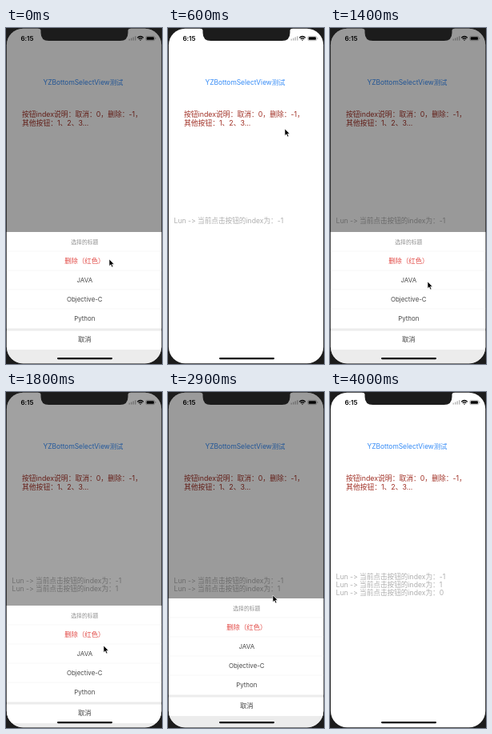
Write an HTML page that moves like this. It is 195 by 420 pixels and loops after 4.1 s.

```html
<!DOCTYPE html>
<html lang="zh-CN">
<head>
<meta charset="utf-8">
<title>YZBottomSelectView</title>
<style>
  html, body { margin: 0; width: 100%; height: 100%; overflow: hidden; background: #1c1c1c; }
  svg { display: block; width: 100%; height: 100%; }
  text {
    font-family: Inter, "Noto Sans CJK SC", "Noto Sans CJK", sans-serif;
    font-feature-settings: "calt" 0, "liga" 0;
    white-space: pre;
  }
  .note { font-size: 8.8px; fill: #a02f24; }
  .log { font-size: 8.65px; fill: #aeaeae; }
  .option { font-size: 7.9px; fill: #484848; text-anchor: middle; }
  .heading { font-size: 6.8px; fill: #909090; }
  .danger { font-size: 8.4px; fill: #e24c48; }
  .cancel { font-size: 8.4px; }
</style>
</head>
<body>
<svg viewBox="0 0 195 420" preserveAspectRatio="none">
  <defs>
    <clipPath id="screen"><rect x=".9" y=".7" width="193.3" height="418.6" rx="20.5"/></clipPath>
  </defs>
  <g clip-path="url(#screen)">
    <rect width="195" height="420" fill="#fff"/>

    <!-- status bar -->
    <text x="18.4" y="16.2" font-size="8" font-weight="600">6:15</text>
    <g fill="#bbb">
      <rect x="153.5" y="13.6" width="1.5" height="2"/>
      <rect x="156" y="12.6" width="1.5" height="3"/>
      <rect x="158.5" y="11.4" width="1.5" height="4.2"/>
      <rect x="161" y="10.2" width="1.5" height="5.4"/>
    </g>
    <g fill="none" stroke="#000" stroke-width="1.2">
      <path d="M164.2 12.2Q168 8.8 171.8 12.2M165.7 13.8Q168 11.8 170.3 13.8"/>
      <path d="M167 15L168 15.9L169 15Q168 14.2 167 15Z" fill="#000" stroke="none"/>
    </g>
    <rect x="174.8" y="10.3" width="11" height="5.4" rx="1.6" fill="none" stroke="#999" stroke-width=".6"/>
    <rect x="175.7" y="11.2" width="9.2" height="3.6" rx=".9"/>
    <rect x="186.5" y="12" width=".8" height="2" rx=".4" fill="#999"/>

    <text x="96.5" y="71" font-size="8.4" fill="#338af6" text-anchor="middle">YZBottomSelectView测试</text>
    <text class="note" x="20" y="111.2">按钮index说明：取消：0，删除：-1，</text>
    <text class="note" x="20" y="121.6">其他按钮：1、2、3...</text>
    <g id="logs"></g>

    <rect id="shade" width="195" height="420"/>
    <g id="sheet">
      <rect width="195" height="200" fill="#ececec"/>
      <rect width="195" height="120.5" fill="#fff"/>
      <rect y="123.5" width="195" height="23.5" fill="#fff"/>
    </g>
    <rect x="64" y="412" width="69" height="2.2" rx="1.1"/>
  </g>
  <path d="M40.5 0V.7Q43.5 .7 43.5 3.5V6Q43.5 16 53.5 16H142.5Q152.5 16 152.5 6V3.5Q152.5 .7 155.5 .7V0Z" fill="#1c1c1c"/>
  <path id="cursor" d="M0 0V8.6L2 6.8L3.4 9.9L4.9 9.2L3.5 6.2H6.2Z" stroke="#fff" stroke-width=".6"/>
</svg>
<script>
const LOOP = 4100, STEP = 100, SLIDE = 300;
const SHEET_TOP = 255, SHEET_HEIGHT = 165, ROW = 24;

// The sheet is already open when the loop begins.
const openings = [-SLIDE, 850, 2625];
const taps = [
  { time: 90, index: -1 },
  { time: 1750, index: 1 },
  { time: 3525, index: 0 }
];
// time, x, y of the pointer tip
const route = [
  [0, 129, 289], [150, 129, 289], [600, 146, 126], [780, 138, 72], [920, 138, 72],
  [1300, 122, 314], [1400, 122, 317], [1850, 122, 317], [2400, 119, 167],
  [2560, 119, 72], [2640, 119, 72], [2900, 131, 254], [3200, 126, 393],
  [3600, 126, 393], [3900, 128, 424], [LOOP, 128, 432]
];

const byId = id => document.getElementById(id);
const [logs, shade, sheet, cursor] = ['logs', 'shade', 'sheet', 'cursor'].map(byId);

function addText(parent, className, x, y, content) {
  const node = document.createElementNS('http://www.w3.org/2000/svg', 'text');
  node.setAttribute('class', className);
  node.setAttribute('x', x);
  node.setAttribute('y', y);
  node.textContent = content;
  parent.append(node);
  return node;
}

function addLine(y) {
  const line = document.createElementNS('http://www.w3.org/2000/svg', 'path');
  line.setAttribute('d', `M0 ${y}H195`);
  line.setAttribute('stroke', '#eee');
  line.setAttribute('stroke-width', .5);
  sheet.append(line);
}

['选择的标题', '删除（红色）', 'JAVA', 'Objective-C', 'Python'].forEach((label, i) => {
  const style = ['option heading', 'option danger'][i] || 'option';
  addText(sheet, style, 98.3, i * ROW + (i ? 15.1 : 14.7), label);
  if (i) addLine(i * ROW);
});
addText(sheet, 'option cancel', 98.3, 137.3, '取消');

const logLines = taps.map(({ index }) =>
  addText(logs, 'log', 7.5, 0, `Lun -> 当前点击按钮的index为：${index}`));

function ease(p) {
  p = Math.min(1, Math.max(0, p));
  return p * p * (3 - 2 * p);
}

function pointerAt(t) {
  const next = Math.max(1, route.findIndex(point => point[0] >= t));
  const [t0, x0, y0] = route[next - 1], [t1, x1, y1] = route[next];
  const p = (t - t0) / (t1 - t0);
  return [x0 + (x1 - x0) * p, y0 + (y1 - y0) * p];
}

function draw(t) {
  const shown = openings.reduce((sum, open, i) =>
    sum + ease((t - open) / SLIDE) - ease((t - taps[i].time) / SLIDE), 0);
  const sheetY = Math.round(SHEET_TOP + SHEET_HEIGHT * (1 - shown));
  sheet.setAttribute('transform', `translate(0 ${sheetY})`);
  shade.setAttribute('opacity', .4 * shown);

  const count = taps.filter(tap => t >= tap.time).length;
  logLines.forEach((line, i) => {
    line.setAttribute('visibility', i < count ? 'visible' : 'hidden');
    line.setAttribute('y', 244 + (i - (count - 1) / 2) * 10.4);
  });

  cursor.setAttribute('transform', `translate(${pointerAt(t)})`);
}

function tick() {
  const t = performance.now() % LOOP;
  draw(Math.floor(t / STEP) * STEP);
  requestAnimationFrame(tick);
}
tick();
</script>
</body>
</html>
```
